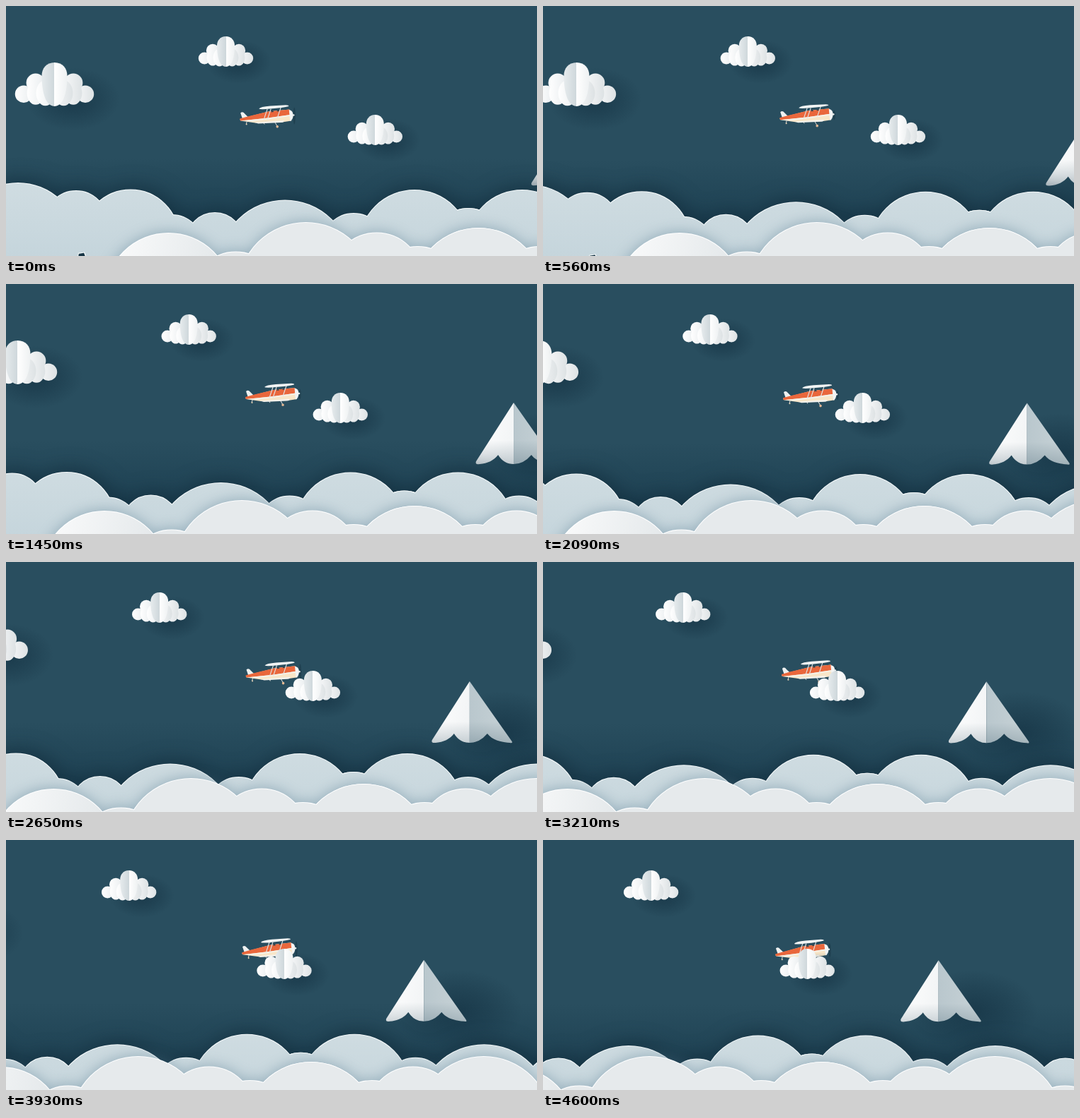
Animation of 750 by 354 pixels, one loop 4.68 s. Source, as an HTML page:

```html
<!DOCTYPE html>
<html lang="en">
<head>
<meta charset="utf-8">
<title>Paper sky</title>
<style>
  html, body { margin: 0; width: 100%; height: 100%; overflow: hidden; background: #294e5f; }
  svg { display: block; width: 750px; height: 354px; }
  #backBank { filter: drop-shadow(4px -3px 14px rgba(14, 38, 54, .6)); }
  #front { filter: drop-shadow(0 -2px 9px rgba(82, 120, 142, .4)); }
</style>
</head>
<body>
<svg viewBox="0 0 750 354">
  <defs>
    <radialGradient id="shade">
      <stop offset="0" stop-color="#122f40" stop-opacity=".65"/>
      <stop offset=".5" stop-color="#122f40" stop-opacity=".35"/>
      <stop offset="1" stop-color="#122f40" stop-opacity="0"/>
    </radialGradient>
    <linearGradient id="dusk" x2="0" y2="1">
      <stop offset="0" stop-color="#16384a" stop-opacity="0"/>
      <stop offset=".65" stop-color="#16384a" stop-opacity=".6"/>
    </linearGradient>
    <linearGradient id="lobeL">
      <stop offset="0" stop-color="#fff"/><stop offset="1" stop-color="#e9edef"/>
    </linearGradient>
    <linearGradient id="lobeR">
      <stop offset="0" stop-color="#f6f7f8"/><stop offset="1" stop-color="#dde2e4"/>
    </linearGradient>
    <linearGradient id="petal">
      <stop offset="0" stop-color="#e6ebed"/><stop offset=".5" stop-color="#ced7db"/>
      <stop offset=".5" stop-color="#fff"/><stop offset="1" stop-color="#eef1f2"/>
    </linearGradient>
    <linearGradient id="tentL" y2=".3">
      <stop offset="0" stop-color="#fff"/><stop offset="1" stop-color="#f3f5f6"/>
    </linearGradient>
    <linearGradient id="tentR">
      <stop offset="0" stop-color="#b9c7cd"/><stop offset="1" stop-color="#c8d3d7"/>
    </linearGradient>
    <linearGradient id="backFill" gradientUnits="userSpaceOnUse" x1="0" y1="255" x2="0" y2="354">
      <stop offset="0" stop-color="#cfdce1"/><stop offset="1" stop-color="#c5d5dc"/>
    </linearGradient>
    <linearGradient id="frontFill" gradientUnits="userSpaceOnUse" x1="170" y1="0" x2="345" y2="30">
      <stop offset="0" stop-color="#fff"/><stop offset="1" stop-color="#e6eaec"/>
    </linearGradient>

    <g id="cloud">
      <ellipse cx="18" cy="36" rx="46" ry="31" fill="url(#shade)"/>
      <g fill="url(#lobeL)">
        <circle cx="-18.5" cy="20" r="9.2"/>
        <circle cx="-30.2" cy="31" r="8.5"/>
        <ellipse cx="-18.5" cy="30" rx="8.5" ry="11.5"/>
        <ellipse cx="-9" cy="30" rx="9" ry="12.5"/>
      </g>
      <g fill="url(#lobeR)">
        <circle cx="30.2" cy="31" r="8.5"/>
        <circle cx="18.5" cy="20" r="9.2"/>
        <ellipse cx="18.5" cy="30" rx="8.5" ry="11.5"/>
        <ellipse cx="9" cy="30" rx="9" ry="12.5"/>
      </g>
      <path d="M0 0C8 0 12.5 6 12.5 13C12.5 22 11 43 0 43S-12.5 22-12.5 13C-12.5 6-8 0 0 0Z" fill="url(#petal)"/>
    </g>
  </defs>

  <rect width="750" height="354" fill="#294e5f"/>
  <use id="cloudA" href="#cloud"/>
  <use id="cloudB" href="#cloud"/>

  <g id="tent">
    <ellipse cx="48" cy="72" rx="92" ry="58" fill="url(#shade)"/>
    <path d="M0 0L-53 83Q-55 88-48 87C-37 86-28 82-22 74Q-14 87 0 87Z" fill="url(#tentL)"/>
    <path d="M0 0L59 84Q62 88 57 87C43 86 32 83 25 74Q14 87 0 87Z" fill="url(#tentR)"/>
  </g>

  <g id="plane">
    <ellipse id="prop" cx="409" cy="156" rx="1.6" fill="#14313f" opacity=".45"/>
    <path d="M342 164L341 168M364 164L367 168M381 164L385 171" stroke="#d9d9d6" fill="none"/>
    <path d="M333 152Q336 149 339 153L344 158L336 161Z" fill="#eef1f1"/>
    <path d="M332 161L345 157L372 150L402 147L405 163L392 165L354 166L333 163Z" fill="#f8e6c8"/>
    <path d="M332 160L345 156.5L372 150L402 147L403 154.5L372 159L333 163Z" fill="#e9673c"/>
    <path d="M334 163L372 159L403 154.5V156.5L372 161L348 164Z" fill="#f5f1e8"/>
    <path d="M401.5 147.5Q407 148 407.5 155Q407 162 403 163.5Z" fill="#f2f4f4"/>
    <path d="M353 165.5L394 162.5Q396 165 390 165.5L358 167Z" fill="#f4f2ec"/>
    <path d="M376 151L378 148L380 150.5ZM384 150L386 147.5L388 149.5Z" fill="#33424b"/>
    <path d="M371 146L366 161M376 146L371 161M390 144L385 159" stroke="#e3e7e8" stroke-width="1.1" fill="none"/>
    <path d="M359 146Q361 143 375 142L397 140.8Q401.5 141 401 142.5Q394 144.5 375 146Q361 147.5 359 146Z" fill="#f1f4f4"/>
    <circle cx="385" cy="171.3" r="1.8" fill="#e3b793"/>
    <circle cx="341.5" cy="168" r="1" fill="#e8d3b5"/>
    <circle cx="408" cy="155" r="1.3" fill="#e9eded"/>
  </g>

  <use id="cloudC" href="#cloud"/>

  <g id="back">
    <rect x="-60" y="215" width="1200" height="139" fill="url(#dusk)"/>
    <g id="backBank" fill="url(#backFill)" stroke="#f6fafb"></g>
  </g>
  <g id="front" fill="url(#frontFill)" stroke="#fff"></g>
</svg>
<script>
const LOOP = 4680, STEP = 80;
const $ = id => document.getElementById(id);

// A bank is mirrored about its middle; each dome is [offset, top, radius].
// The rims go down first so that the fills hide them inside the bank.
function bank(id, middle, domes) {
  let svg = '';
  for (const rim of [2, 0])
    for (const [offset, top, r] of domes)
      for (const x of [middle - offset, middle + offset])
        svg += `<circle cx="${x}" cy="${top + r}" r="${r}" stroke-width="${rim}"/>`;
  $(id).innerHTML = svg;
}

bank('backBank', 653, [
  [0, 287, 44], [76, 261, 78], [162, 294, 44], [259, 275.5, 93], [358, 293, 40],
  [419, 296, 44], [477, 260.5, 68], [554, 262, 44], [636, 251, 86]
]);
bank('front', 667.5, [
  [0, 315, 92], [86, 341, 60], [144, 321.5, 64],
  [244, 307, 95], [343, 348.5, 60], [438, 322, 89]
]);

function place(id, x, y, more = '') {
  $(id).setAttribute('transform', `translate(${x.toFixed(2)} ${y.toFixed(2)}) ${more}`);
}

function draw(t) {
  const u = t + Math.min(t, 30);
  const p = .0625 * u - .65e-6 * u * u;   // scroll distance, slowing slightly
  place('cloudA', 68.5 - .575 * p, 80, 'scale(1.44)');
  place('cloudB', 310.5 - .578 * p, 43);
  place('cloudC', 521.3 - .542 * p, 154);
  place('tent', 795.5 - .867 * p, 167 + .012 * p);
  place('back', -p, .078 * p - .000066 * p * p);
  place('front', -p, 0);
  const bob = 1.5 * Math.cos(2 * Math.PI * (t - 2100) / 2900) - .2;
  const tilt = -1.5 * (t / LOOP) ** 4;
  place('plane', 7 - 1.9e-6 * (t - 2150) ** 2, bob, `rotate(${tilt.toFixed(2)} 370 155)`);
  $('prop').setAttribute('ry', 6 + 6 * Math.abs(Math.cos(t / 70)));
}

// The picture advances in hard steps rather than smoothly.
let shown = -1;
const start = performance.now();
function frame() {
  const now = (performance.now() - start) % LOOP;
  const t = Math.floor((now + 1) / STEP) * STEP;
  if (t !== shown) draw(shown = t);
  requestAnimationFrame(frame);
}
frame();
</script>
</body>
</html>
```
